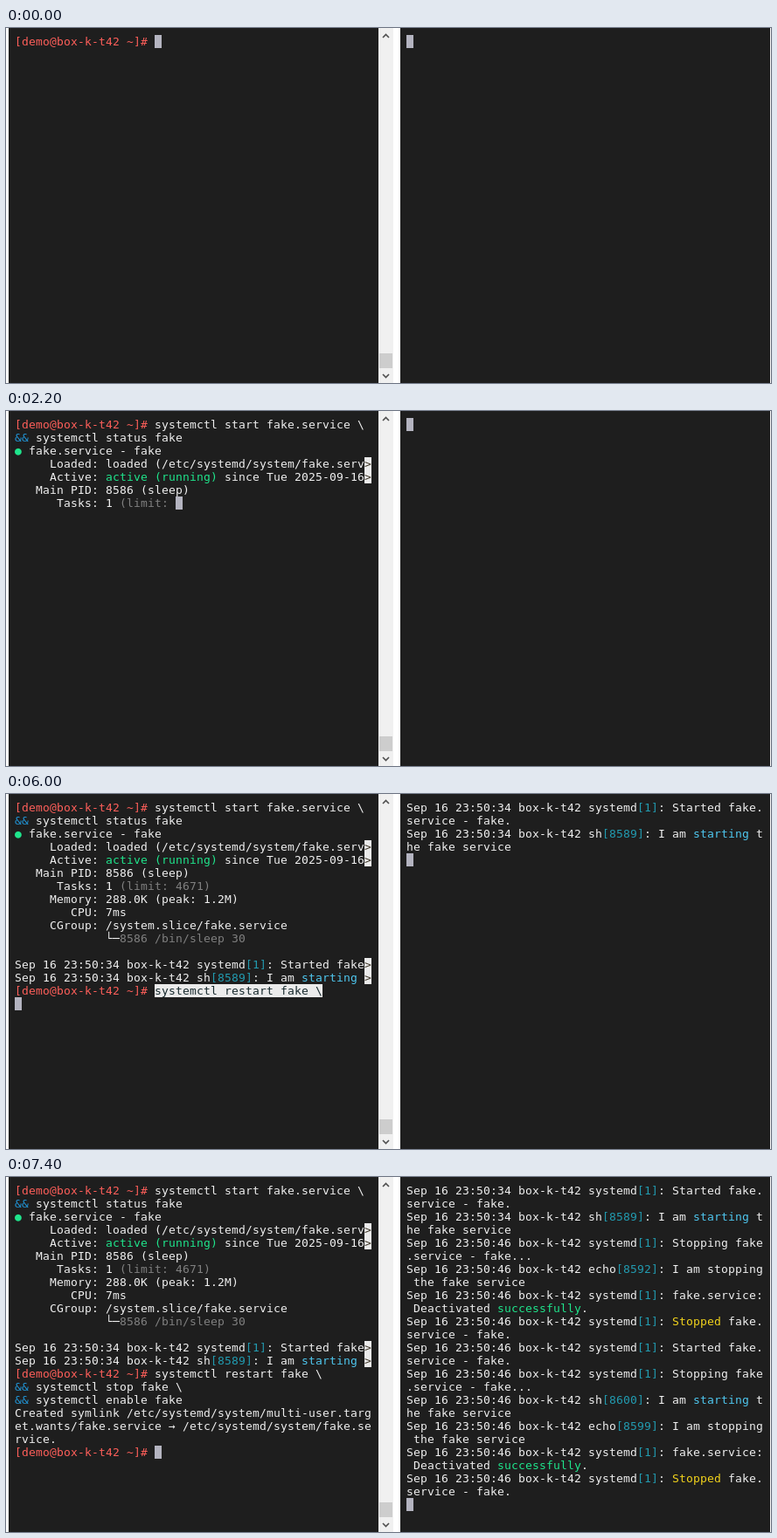
These frames come from a looping animation (875 by 407 pixels, 8 s). An HTML page with a canvas:

```html
<!DOCTYPE html>
<html lang="en">
<head>
<meta charset="utf-8">
<title>Service log in two terminals</title>
<style>
  html, body { margin: 0; width: 100%; height: 100%; overflow: hidden; background: #fff; }
  canvas { display: block; }
</style>
</head>
<body>
<canvas id="stage" width="875" height="407"></canvas>
<script>
const ctx = document.getElementById('stage').getContext('2d');
const LOOP = 8000, COLS = 51, CELL_W = 8, CELL_H = 15, TOP = 8;
const BG = '#1e1e1e', FG = '#f0f0f0', INVERSE = '#ebebeb', CURSOR = '#b4b4c0';

// Syntax colouring, as the terminal does it: [pattern, text colour, background]
const RULES = [
  [/^\[\w+@\S+ ~\]#/g, '#ff5f5a'],
  [/^&&/g, '#2196d8'],
  [/\[\d+\]/g, '#229bb0'],
  [/\bstarting\b/g, '#4fc8f0'],
  [/\bStopped\b/g, '#f4d51c'],
  [/\bsuccessfully\b|●|\bactive \(running\)/g, '#1fe58c'],
  [/\(limit:[^)]*\)?|8586 \/bin.*/g, '#808080'],
  [/>$|^lines .*/g, '#3c3426', INVERSE],
];

const HOST = 'box-k-t42';
const PROMPT = `[demo@${HOST} ~]# `;
const log = (time, unit, message) => `Sep 16 23:50:${time} ${HOST} ${unit}: ${message}`;
const started = time => log(time, 'systemd[1]', 'Started fake.service - fake.');
const starting = (time, pid) => log(time, `sh[${pid}]`, 'I am starting the fake service');
const stopping = log(46, 'systemd[1]', 'Stopping fake.service - fake...');
const stopped = pid => [
  log(46, `echo[${pid}]`, 'I am stopping the fake service'),
  log(46, 'systemd[1]', 'fake.service: Deactivated successfully.'),
  log(46, 'systemd[1]', 'Stopped fake.service - fake.'),
];

const startCmd = [PROMPT + 'systemctl start fake.service \\', '&& systemctl status fake'];
const head = [
  ...startCmd,
  '● fake.service - fake',
  '     Loaded: loaded (/etc/systemd/system/fake.serv>',
  '     Active: active (running) since Tue 2025-09-16>',
  '   Main PID: 8586 (sleep)',
];
const partial = [...head, '      Tasks: 1 (limit: '];
const status = [
  ...head,
  '      Tasks: 1 (limit: 4671)',
  '     Memory: 288.0K (peak: 1.2M)',
  '        CPU: 7ms',
  '     CGroup: /system.slice/fake.service',
  '             └─8586 /bin/sleep 30',
  '',
  ...[started(34), starting(34, 8589)].map(s => s.slice(0, COLS - 1) + '>'),
];
const restart = [...status, PROMPT + 'systemctl restart fake \\'];
const restartCmd = [...restart, '&& systemctl stop fake \\', '&& systemctl enable fake'];
const created = [...restartCmd, 'Created symlink /etc/systemd/system/multi-user.target.wants/fake.service → /etc/systemd/system/fake.service.'];

const log1 = [started(34), starting(34, 8589)];
const log2 = [...log1, stopping, ...stopped(8592)];
const log3 = [...log2, started(46), stopping, starting(46, 8600)];
const log4 = [...log3, ...stopped(8599)];

// start time, left lines, right lines, row where a selection starts after the prompt
const STEPS = [
  [0, [PROMPT], []],
  [1300, startCmd, [], 0],
  [1800, startCmd, []],
  [2200, partial, []],
  [2300, [...status, 'lines 1-12/12 (END)'], []],
  [2600, [...status, 'lines 1-12/12 (END)'], log1],
  [3400, [...status, ''], log1],
  [3500, [...status, PROMPT], log1],
  [6000, [...restart, ''], log1, 14],
  [6100, restartCmd, log1, 14],
  [6500, restartCmd, log1],
  [7000, [...restartCmd, ''], log1],
  [7100, [...restartCmd, ''], log2],
  [7200, [...restartCmd, ''], log3],
  [7300, [...created, ''], log4],
  [7400, [...created, PROMPT], log4],
];

function rect(color, x, y, w, h) {
  ctx.fillStyle = color;
  ctx.fillRect(x, y, w, h);
}

function styleLine(line) {
  const cells = [...line].map(ch => ({ ch, color: FG }));
  for (const [pattern, color, back] of RULES)
    for (const match of line.matchAll(pattern))
      for (let i = 0; i < match[0].length; i++)
        Object.assign(cells[match.index + i], { color, back });
  return cells;
}

function drawTerminal(left, lines, selectedRow = Infinity) {
  rect(BG, left - 7, 0, 423, 407);
  const cell = (color, row, col) =>
    rect(color, left + col * CELL_W, TOP + row * CELL_H, CELL_W, CELL_H);
  let row = 0, col = 0;
  lines.forEach((line, n) => {
    if (n) row++;
    col = 0;
    for (let { ch, color, back } of styleLine(line)) {
      if (col === COLS) { row++; col = 0; }
      if (row > selectedRow || row === selectedRow && col >= PROMPT.length) {
        back = INVERSE;
        color = color === FG ? '#16282c' : '#7a5a28';
      }
      if (back) cell(back, row, col);
      ctx.fillStyle = color;
      ctx.fillText(ch, left + col * CELL_W, TOP + row * CELL_H + 12);
      col++;
    }
  });
  cell(CURSOR, row, col);
}

function drawScrollbar() {
  rect('#f0f0f0', 426, 0, 17, 407);
  rect('#cdcdcd', 427, 373, 15, 17);
  ctx.strokeStyle = '#505050';
  ctx.lineWidth = 1.6;
  for (const [y, d] of [[9, 2], [399, -2]]) {
    ctx.beginPath();
    ctx.moveTo(431, y + d);
    ctx.lineTo(434.5, y - d * 0.75);
    ctx.lineTo(438, y + d);
    ctx.stroke();
  }
}

let shown;
function frame() {
  const t = performance.now() % LOOP;
  const step = STEPS.findLast(s => s[0] <= t);
  if (step !== shown) {
    shown = step;
    const [, leftLines, rightLines, selectedRow] = step;
    rect('#fff', 0, 0, 875, 407);
    ctx.font = '13px "DejaVu Sans Mono", monospace';
    drawTerminal(10, leftLines, selectedRow);
    drawTerminal(458, [...rightLines, '']);
    drawScrollbar();
  }
  requestAnimationFrame(frame);
}
frame();
</script>
</body>
</html>
```
